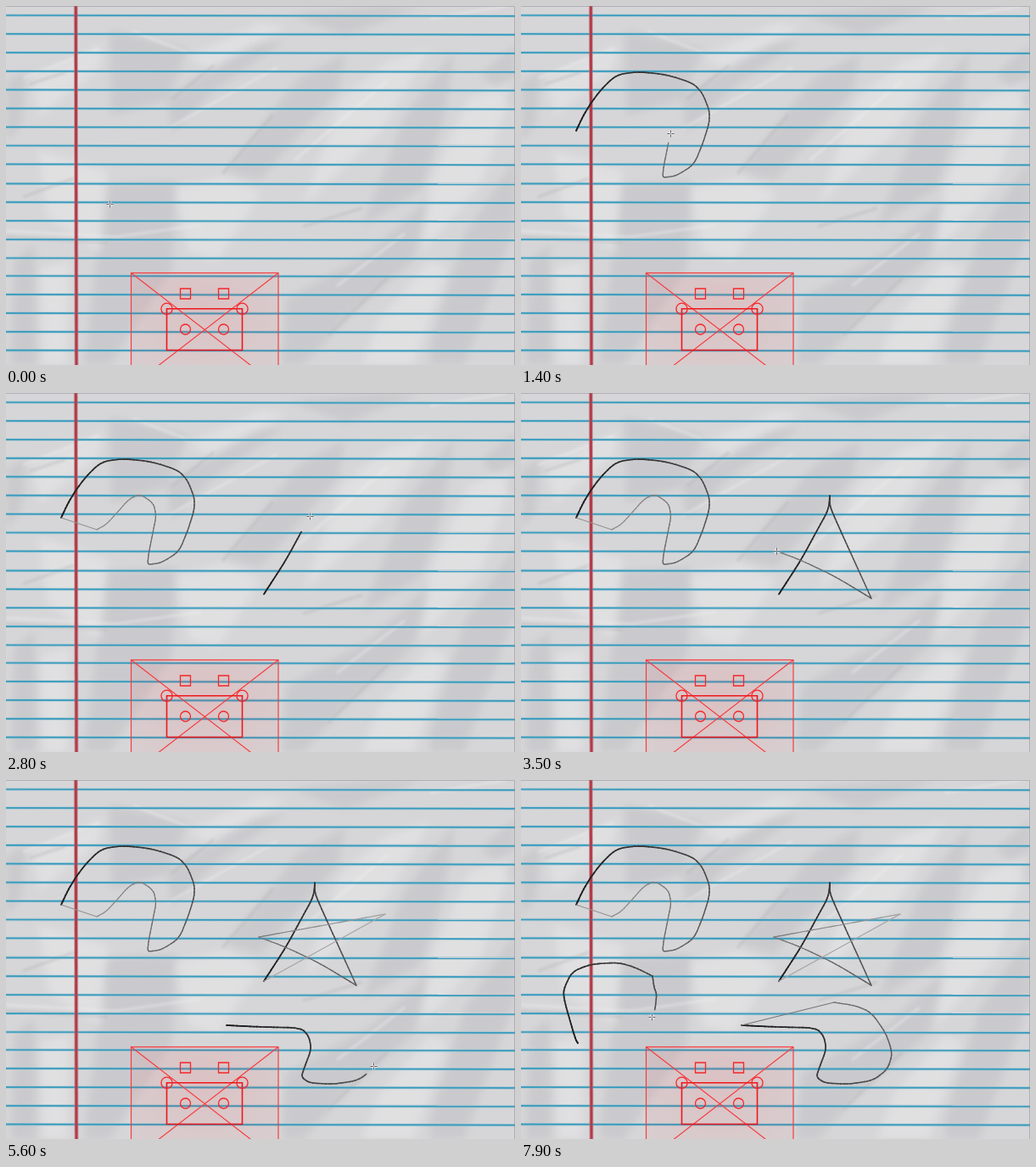
An HTML page with a canvas that plays this animation: 600x423 px, repeating every 8 s.

```html
<!DOCTYPE html>
<html lang="en">
<head>
<meta charset="utf-8">
<title>Drawing on paper</title>
<style>
  html, body { margin: 0; width: 100%; height: 100%; overflow: hidden; background: #d6d6d8; }
  svg, canvas { position: absolute; left: 0; top: 0; width: 600px; height: 423px; display: block; }
</style>
</head>
<body>
<svg viewBox="0 0 600 423">
  <defs>
    <filter id="soft" x="-10%" y="-10%" width="120%" height="120%"><feGaussianBlur stdDeviation="5"/></filter>
    <filter id="crisp"><feGaussianBlur stdDeviation="1.6"/></filter>
    <radialGradient id="blush" cx=".5" cy=".3" r=".7">
      <stop offset="0" stop-color="#f33" stop-opacity=".13"/>
      <stop offset="1" stop-color="#f33" stop-opacity=".05"/>
    </radialGradient>
  </defs>
  <rect width="600" height="423" fill="#d6d6d8"/>
  <g filter="url(#soft)">
    <g fill="#c3c3c6" opacity=".6">
      <path d="M0 90L24 76 18 140 0 160ZM10 300L34 280 36 423 6 423Z"/>
      <path d="M122 28L215 50 190 110 124 130ZM118 210L200 205 196 310 122 423 92 423Z"/>
      <path d="M190 108L290 45 330 40 245 100 195 150Z"/>
      <path d="M258 195L345 85 400 55 392 100 330 170 300 205Z"/>
      <path d="M420 260L470 130 530 50 515 140 490 215Z"/>
      <path d="M330 345L430 290 500 225 480 300 400 370 350 423 325 423Z"/>
      <path d="M500 400L540 270 600 180 600 260 540 423 500 423Z"/>
      <path d="M335 10L440 0 490 0 400 35ZM560 80L600 45 600 120Z"/>
    </g>
    <g fill="#e6e6e8" opacity=".6">
      <path d="M30 85L115 45 108 75 40 130ZM38 170L120 195 112 290 50 250Z"/>
      <path d="M215 60L300 20 330 25 240 75Z"/>
      <path d="M395 110L450 65 500 50 440 150 350 235Z"/>
      <path d="M500 210L545 110 600 85 560 210 490 290Z"/>
      <path d="M200 215L260 200 300 220 250 300 215 290ZM440 370L500 300 520 310 480 423 420 423Z"/>
      <path d="M40 310L75 300 72 423 44 423Z"/>
    </g>
  </g>
  <g filter="url(#crisp)" fill="none" stroke-width="3" opacity=".45">
    <path stroke="#eee" d="M20 85L110 50M150 30L215 55M190 145L320 72M340 182L450 88M0 265L130 272 230 258M390 330L470 268M500 15L590 0"/>
    <path stroke="#b4b4b7" d="M28 92L70 78M195 110L245 70M255 198L315 128M350 260L420 238M0 272L120 279M380 388L450 320M20 225L80 203"/>
  </g>
  <g id="rules" fill="none"></g>
  <path d="M82.3 0L83 423" stroke="#b9737c" stroke-width="5" opacity=".55"/>
  <path d="M82.3 0L83 423" stroke="#b23b48" stroke-width="3"/>
  <path d="M0 .5H599.5V423" fill="none" stroke="#85808c" opacity=".45"/>
  <g fill="none" stroke="#f5262b" stroke-width="1.3">
    <g stroke="#f63d40" stroke-width="1.2">
      <rect x="147.5" y="314.5" width="173.5" height="134" fill="url(#blush)"/>
      <path d="M147.5 314.5L321 448.5M321 314.5L147.5 448.5"/>
    </g>
    <path stroke="#ee171c" stroke-width="1.6" d="M189.5 356.8H278.5V405.5H189.5Z"/>
    <path d="M205.5 333H217.5V345H205.5ZM250.5 333H262.5V345H250.5Z"/>
    <circle cx="189.5" cy="356.8" r="6.6"/><circle cx="278.5" cy="356.8" r="6.6"/>
    <circle cx="211.5" cy="381" r="6"/><circle cx="256.5" cy="381" r="6"/>
  </g>
</svg>
<canvas id="ink" width="600" height="423"></canvas>
<script>
const LOOP = 8000, STEP = 100, LEAD = 50;
const ctx = document.getElementById('ink').getContext('2d');

// Ruled lines, each a soft halo below a thin core.
let ruled = '';
for (let i = 0; i < 19; i++) {
  const y = 11 + i * 21.93 + (i > 8 && i < 14 ? 0.9 : 0);
  const d = `M0 ${y.toFixed(1)}L600 ${(y + 0.9).toFixed(1)}`;
  ruled += `<path d="${d}" stroke="#8fbdcd" stroke-width="3.4" opacity=".6"/>` +
    `<path d="${d}" stroke="#369bbd" stroke-width="1.7"/>`;
}
document.getElementById('rules').innerHTML = ruled;

// Runs are separated by "|" where the pen turns a sharp corner.
const strokes = [
  { runs: '65,147 73,130 82,115 94,99 108,85 118,80 140,77.5 172,81 203,91 214,103 222,123 222,137 215,160 204,187 183,200 170,202 167,201 168,190 174,160 177,145 174,130 158,119 145,125 130,142 118,155 107,161',
    keys: [[400, 0], [1400, .755], [1900, 1]] },
  { runs: '304,237 330,197 350,160 360,142 363,133 364,121|364,121 364,133 372,152 413,242|413,242 370,216 330,197 298,185|298,185 447,158',
    keys: [[2600, 0], [3500, .71], [3560, .716], [4000, 1]] },
  { runs: '260,289 300,291 348,292 357,302 360,317 352,338 348,350 358,357 386,358.5 415,354 432,341 438,322 430,298 413,274 395,266 369,262',
    keys: [[4700, 0], [6100, 1]] },
  { runs: '67,310 64,305 51,260 50,247 60,226 82,217 115,215 135,221 155,231|155,231 157,245 160,252 158,271 154,279',
    keys: [[7000, 0], [7900, .962], [7950, 1]] }
];

// Cursor stops while the pen is up: time, x, y.
const hover = [[0, 122, 233], [400, 65, 147], [1900, 107, 161], [2000, 107, 161], [2600, 304, 237],
  [4000, 447, 158], [4600, 268, 287], [4700, 260, 289], [6100, 369, 262], [6700, 109, 244], [7000, 67, 310]];

const mix = (a, b, f) => a + (b - a) * f;

function sample(keys, t) {
  if (t <= keys[0][0]) return keys[0].slice(1);
  const i = keys.findIndex(k => k[0] > t);
  if (i < 0) return keys[keys.length - 1].slice(1);
  const a = keys[i - 1], b = keys[i], f = (t - a[0]) / (b[0] - a[0]);
  return a.slice(1).map((v, n) => mix(v, b[n + 1], f));
}

// Corner cutting that keeps both ends.
function smooth(pts) {
  const out = [pts[0]];
  for (let i = 1; i < pts.length; i++) {
    const [a, b] = [pts[i - 1], pts[i]];
    for (const f of [.2, .8]) out.push([mix(a[0], b[0], f), mix(a[1], b[1], f)]);
  }
  out.push(pts[pts.length - 1]);
  return out;
}

for (const s of strokes) {
  const pts = s.runs.split('|').flatMap(run =>
    smooth(smooth(run.split(' ').map(p => p.split(',').map(Number)))));
  let len = 0;
  s.pts = pts.map((p, i) => {
    if (i) len += Math.hypot(p[0] - pts[i - 1][0], p[1] - pts[i - 1][1]);
    return [len, ...p];
  });
  s.len = len;
  s.start = s.keys[0][0];
  s.end = s.keys[s.keys.length - 1][0];
}

function segment(x1, y1, x2, y2, at) {
  const v = Math.round(24 + at * .245);
  ctx.strokeStyle = `rgb(${v},${v},${v})`;
  ctx.lineWidth = Math.max(1.1, 1.8 - at * .0015);
  ctx.beginPath();
  ctx.moveTo(x1, y1);
  ctx.lineTo(x2, y2);
  ctx.stroke();
}

function drawStroke(s, t) {
  const drawn = sample(s.keys, t)[0] * s.len;
  let prev = s.pts[0];
  for (let at = 4; at < drawn + 4; at += 4) {
    const d = Math.min(at, drawn), next = [d, ...sample(s.pts, d)];
    // Pass through any vertices inside this piece.
    for (const p of s.pts) {
      if (p[0] > prev[0] && p[0] < d) {
        segment(prev[1], prev[2], p[1], p[2], d);
        prev = p;
      }
    }
    segment(prev[1], prev[2], next[1], next[2], d);
    prev = next;
  }
  if (t >= s.end) segment(prev[1], prev[2], s.pts[0][1], s.pts[0][2], s.len + 25);
}

function cursorAt(t) {
  const s = strokes.find(s => t >= s.start && t < s.end);
  return s ? sample(s.pts, sample(s.keys, t + LEAD)[0] * s.len) : sample(hover, t);
}

function drawCursor(x, y) {
  x = Math.round(x) + .5;
  y = Math.round(y) + .5;
  for (const [color, width] of [['rgba(240,240,242,.75)', 3], ['#55555a', 1]]) {
    ctx.strokeStyle = color;
    ctx.lineWidth = width;
    ctx.beginPath();
    for (const [dx, dy] of [[1, 0], [-1, 0], [0, 1], [0, -1]]) {
      ctx.moveTo(x + dx, y + dy);
      ctx.lineTo(x + dx * 4, y + dy * 4);
    }
    ctx.stroke();
  }
}

function draw(t) {
  ctx.clearRect(0, 0, 600, 423);
  ctx.lineCap = 'round';
  for (const s of strokes) if (t > s.start) drawStroke(s, t);
  ctx.lineCap = 'butt';
  drawCursor(...cursorAt(t));
}

const origin = performance.now();
function tick() {
  const t = (performance.now() - origin) % LOOP;
  draw(Math.floor(t / STEP) * STEP);
  requestAnimationFrame(tick);
}
tick();
</script>
</body>
</html>
```
